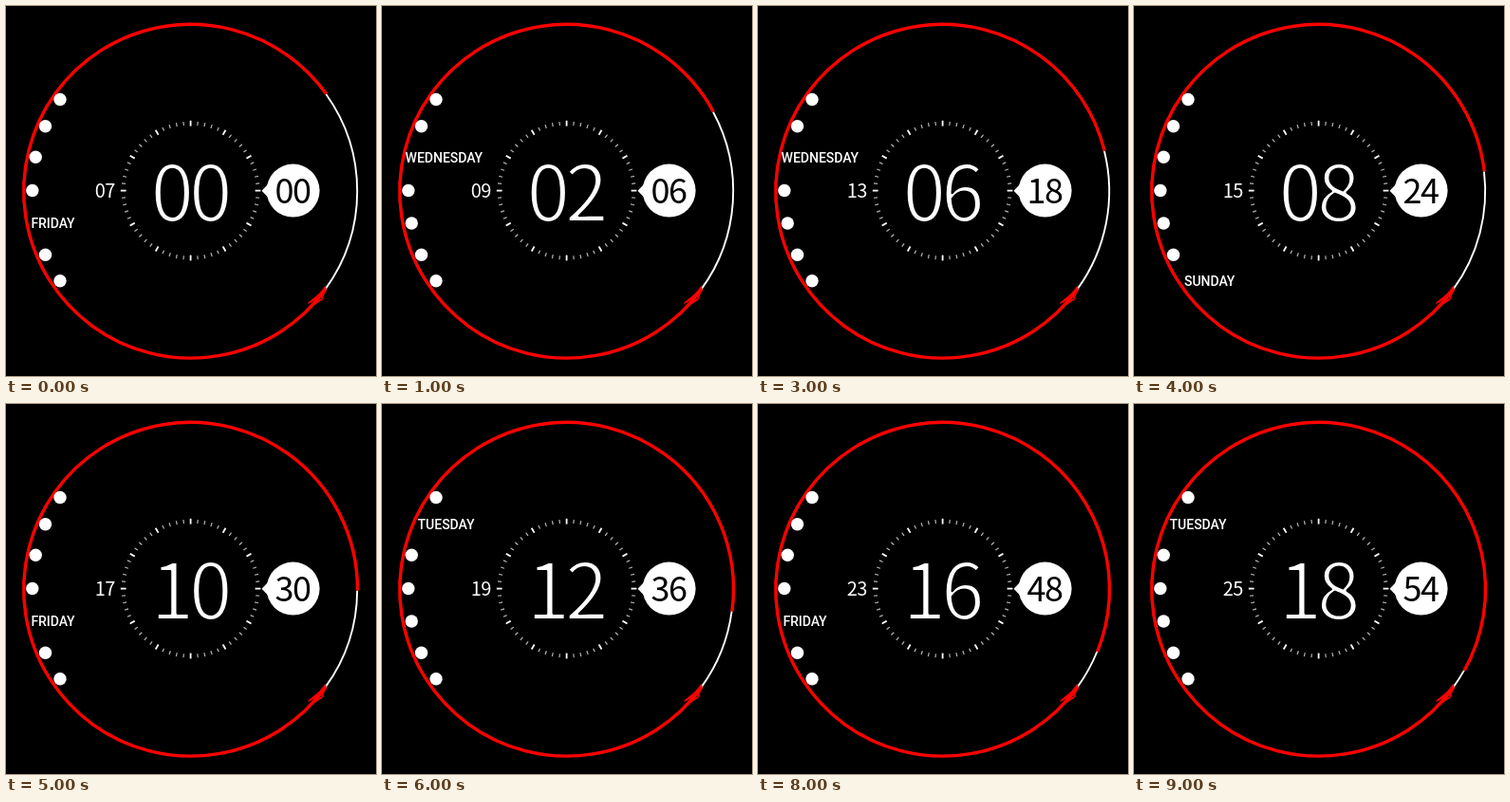
These frames come from a looping animation (390x390 px, 10 s). An HTML page with a canvas:

```html
<!DOCTYPE html>
<html lang="en">
<head>
<meta charset="utf-8">
<title>Radial clock</title>
<style>
html, body { margin: 0; width: 100%; height: 100%; overflow: hidden; background: #000; }
canvas { display: block; }
</style>
</head>
<body>
<canvas id="stage" width="390" height="390"></canvas>
<script>
const ctx = document.getElementById('stage').getContext('2d');
const TAU = Math.PI * 2;
const LOOP = 10000, STEP = 1000;
const C = 194.6;
const DIGITS = '"Noto Sans CJK JP", "Noto Sans CJK SC", "Noto Sans CJK", sans-serif';
const LABEL = '500 14px Roboto, sans-serif';

// Dot position and label start for each day of the week
const DAYS = [
  { name: 'MONDAY', x: 57, y: 98.5, left: 52.5 },
  { name: 'TUESDAY', x: 41.5, y: 126.8, left: 37.6 },
  { name: 'WEDNESDAY', x: 31.2, y: 159.2, left: 24.6 },
  { name: 'THURSDAY', x: 27.8, y: 194.5, left: 23 },
  { name: 'FRIDAY', x: 31.2, y: 229, left: 26.4 },
  { name: 'SATURDAY', x: 41.5, y: 262.3, left: 37.3 },
  { name: 'SUNDAY', x: 57, y: 289.8, left: 53 }
];
const WEEKDAY = [4, 2, 4, 2, 6, 4, 1, 6, 4, 1];

const pad = n => String(n).padStart(2, '0');
const rad = deg => deg * Math.PI / 180;

function disc(x, y, r, color) {
  ctx.fillStyle = color;
  ctx.beginPath();
  ctx.arc(x, y, r, 0, TAU);
  ctx.fill();
}

function arc(r, from, to, width, color) {
  ctx.strokeStyle = color;
  ctx.lineWidth = width;
  ctx.beginPath();
  ctx.arc(C, C + 0.6, r, rad(from), rad(to));
  ctx.stroke();
}

function path(points) {
  ctx.beginPath();
  points.forEach(([x, y]) => ctx.lineTo(x, y));
}

// Two digits around a middle x; a black outline thins the strokes
function digits(value, mid, pitch, base, size, color, thin = 0) {
  ctx.font = `400 ${size}px ${DIGITS}`;
  ctx.textAlign = 'center';
  [...pad(value)].forEach((d, i) => {
    const x = mid + (i - 0.5) * pitch;
    ctx.fillStyle = color;
    ctx.fillText(d, x, base);
    if (thin) {
      ctx.strokeStyle = '#000';
      ctx.lineWidth = thin;
      ctx.lineJoin = 'round';
      ctx.strokeText(d, x, base);
    }
  });
}

function ticks() {
  for (let i = 0; i < 60; i++) {
    const major = i % 5 === 0;
    const a = i * TAU / 60;
    const r0 = major ? 68 : 69, r1 = major ? 73.8 : 73;
    ctx.strokeStyle = major ? '#fff' : '#b4b4b4';
    ctx.lineWidth = major ? 1.8 : 1.2;
    ctx.beginPath();
    ctx.moveTo(C + r0 * Math.cos(a), C + r0 * Math.sin(a));
    ctx.lineTo(C + r1 * Math.cos(a), C + r1 * Math.sin(a));
    ctx.stroke();
  }
}

function ring(step) {
  const head = -35.6 + step * 7.2;
  arc(175.6, head, 36, 1.9, '#fff');
  arc(175.9, 36, 360 + head, 3.4, '#f00');
  // Rough scribble at the start of the red arc
  path([[337, 295.5], [331, 303], [319, 313], [331, 306], [319, 318], [333, 309], [337, 297]]);
  ctx.lineWidth = 1.5;
  ctx.stroke();
}

function week(today) {
  DAYS.forEach((day, i) => {
    if (i !== today) return disc(day.x, day.y, 6.7, '#fff');
    ctx.font = LABEL;
    ctx.textAlign = 'left';
    ctx.fillStyle = '#fff';
    ctx.fillText(day.name, day.left, day.y + 5.4);
  });
}

function draw(step) {
  ctx.fillStyle = '#000';
  ctx.fillRect(0, 0, 390, 390);
  digits(step * 2, 195.6, 40.5, 226.5, 82, '#fff', 2.2);
  ticks();
  ring(step);
  week(WEEKDAY[step]);
  digits(7 + step * 2, 104.6, 10.4, 201.9, 20, '#fff');
  disc(302.6, 194.6, 28, '#fff');
  path([[269.5, 194.8], [277.5, 186.5], [277.5, 203]]);
  ctx.fill();
  digits(step * 6, 302.8, 18.4, 208, 36, '#000');
}

const start = performance.now();
function frame() {
  const t = (performance.now() - start) % LOOP;
  draw(Math.floor(t / STEP));
  requestAnimationFrame(frame);
}
frame();
</script>
</body>
</html>
```
